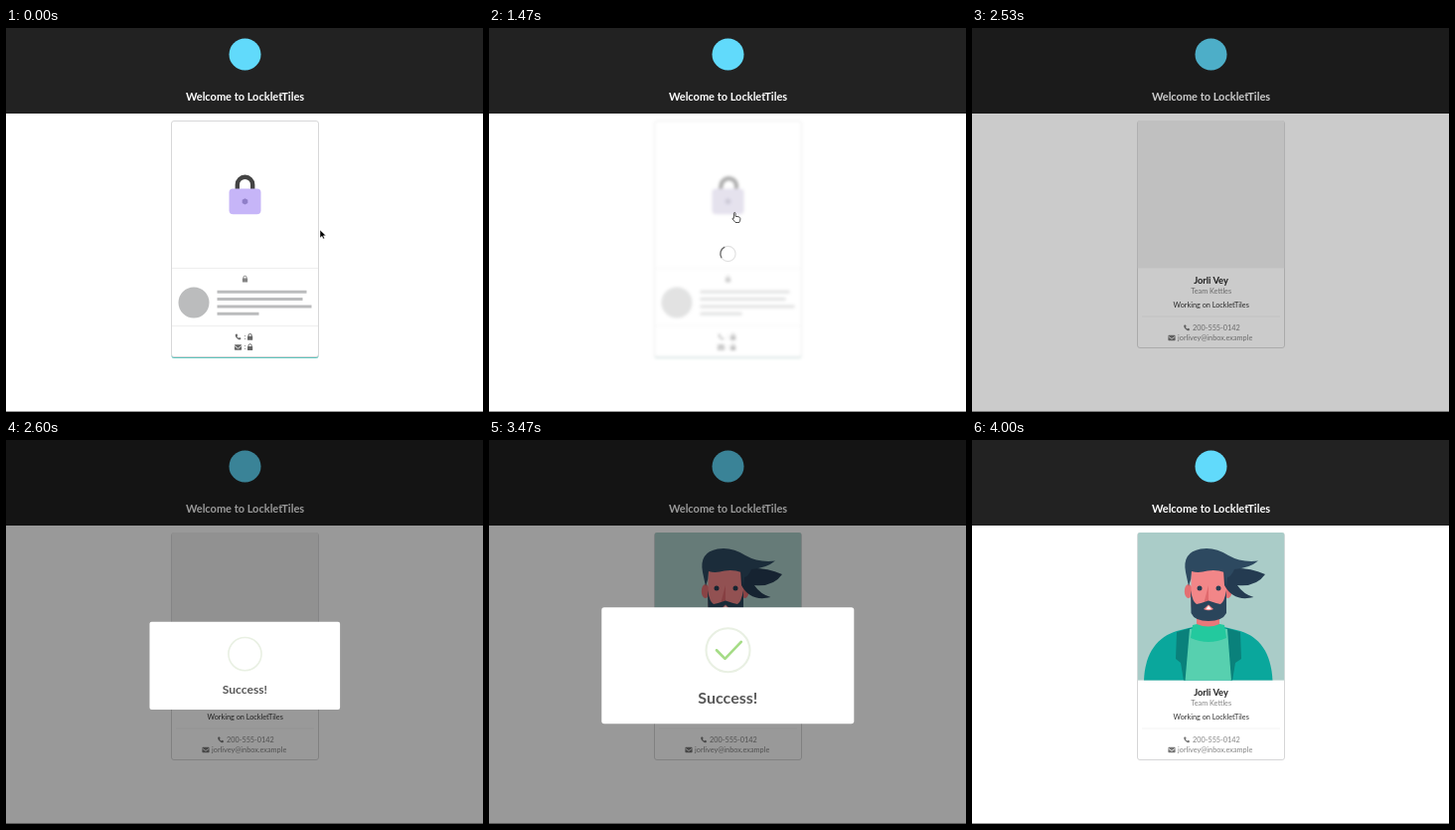
Animation, 480 px wide and 386 px high, one loop 4.07 s. Source, as an HTML page:

```html
<!DOCTYPE html>
<html lang="en">
<head>
<meta charset="utf-8">
<title>Profile unlock</title>
<style>
  html, body { margin: 0; width: 100%; height: 100%; overflow: hidden; background: #fff; }
  svg { display: block; width: 480px; height: 386px; font-family: Lato, sans-serif; }
  .mid { text-anchor: middle; }
  .small { font-size: 7.3px; fill: #858585; }
  .line { fill: none; stroke-linecap: round; stroke-linejoin: round; }
</style>
</head>
<body>
<svg viewBox="0 0 480 386">
  <defs>
    <g id="miniLock">
      <rect x="-2.6" y="-.7" width="5.2" height="4" rx=".6"/>
      <path d="M-1.6 0V-1.4A1.6 1.7 0 0 1 1.6-1.4V0" fill="none" stroke="currentColor"/>
    </g>
    <path id="phone" d="M-2.3-2.7L-1-2.9L-.3-1.2L-1.1-.5Q-.5 .7 .6 1.2L1.4 .4L3 1.2L2.6 2.6Q1.3 3.3-.5 2Q-2.8 .2-2.9-1.7Z"/>
    <g id="mail">
      <rect x="-3.6" y="-2.8" width="7.2" height="5.6" rx=".7"/>
      <path d="M-3.6-1.6L0 1.1L3.6-1.6" fill="none" stroke="#fff" stroke-width=".8"/>
    </g>
    <clipPath id="photoClip"><path d="M166.5 241.5V95.5Q166.5 93 169 93H312Q314.5 93 314.5 95.5V241.5Z"/></clipPath>
  </defs>

  <rect width="480" height="386" fill="#fff"/>
  <rect width="480" height="86" fill="#222"/>
  <circle cx="240.5" cy="26.5" r="16" fill="#61dafb"/>
  <text class="mid" x="240.5" y="73" font-size="11" font-weight="700" fill="#fff">Welcome to LockletTiles</text>

  <g id="locked">
    <rect x="166.5" y="94.5" width="148" height="237.5" rx="2.5" fill="#5fc4bd"/>
    <rect x="166.5" y="93.5" width="148" height="237" rx="2.5" fill="#fff" stroke="#d8d8d9"/>
    <path d="M167 241.5H314M167 299.5H314" stroke="#eee"/>
    <path id="shackle" class="line" d="M232.8 164V157.5A7.7 7.7 0 0 1 248.2 157.5V164" stroke="#444" stroke-width="4.4"/>
    <rect x="224.5" y="161.5" width="32" height="25.7" rx="4" fill="#c6b5f8"/>
    <path d="M240.5 171.3L243.3 172.8V176L240.5 177.5L237.7 176V172.8Z" fill="#8f7fc8"/>
    <g fill="#bbbcbd">
      <circle cx="189" cy="276" r="15.5"/>
      <path d="M212.5 263.7h90v3h-90zM212.5 271h86v3h-86zM212.5 278.5h95v3h-95zM212.5 285.7h42v3h-42z"/>
    </g>
    <g fill="#666" color="#666">
      <use href="#miniLock" x="240.5" y="252.3" opacity=".8"/>
      <use href="#phone" x="233.5" y="310.5"/>
      <use href="#mail" x="233.5" y="321"/>
      <use href="#miniLock" x="245.6" y="310.5"/>
      <use href="#miniLock" x="245.6" y="320.8"/>
      <text x="239.4" y="313" font-size="7.3">:</text>
      <text x="239.4" y="323.3" font-size="7.3">:</text>
    </g>
  </g>

  <g id="dimmer">
    <rect x="160" y="88" width="161" height="250" fill="#fff" opacity=".6"/>
    <circle class="line" cx="240.5" cy="227" r="7.6" stroke="#000" stroke-opacity=".12" stroke-width="1.2"/>
    <path id="spinner" class="line" d="M235.1 221.6A7.6 7.6 0 0 1 245.9 221.6" stroke="#666" stroke-width="1.3"/>
  </g>

  <g id="profile">
    <rect x="166.5" y="93.5" width="148" height="228" rx="2.5" fill="#fff" stroke="#d6d6d7"/>
    <g clip-path="url(#photoClip)">
      <rect x="166.5" y="93" width="148" height="149" fill="#f1f1f1"/>
      <g id="portrait">
        <rect x="166.5" y="93" width="148" height="149" fill="#aaccc8"/>
        <path d="M173 242C174 213 187 198 206 192L222 188H254L270 192C289 198 301 213 302.5 242Z" fill="#0aa79c"/>
        <path d="M206 193L220 189L215 242H213L210 224L205 220ZM256 189L270 193L271 220L265 224L262 242H260Z" fill="#0a817b"/>
        <path d="M219 190H257L261 242H214.5Z" fill="#57d0af"/>
        <path d="M222 186Q238 181 254 186L256 199Q238 207 220 199Z" fill="#23c99e"/>
        <path d="M226 168H249V185Q238 190 226 185Z" fill="#e9777a"/>
        <ellipse cx="217.8" cy="152" rx="4" ry="7" fill="#e46f72"/>
        <ellipse cx="257.5" cy="152" rx="4" ry="7" fill="#e46f72"/>
        <path d="M220.5 126H256V168Q238 182 220.5 168Z" fill="#f28688"/>
        <path d="M238 146V163H233.5Z" fill="#e0696d"/>
        <path d="M253 130Q274 126 295 135Q286 148 267 146Q273 155 283.5 158Q263 163 254 146Z" fill="#243b51"/>
        <path d="M218 147L215 133Q211 113 230 109.5Q244 107 258 116Q271 123.5 288 121.5Q279 129 264 130Q261 137 257 138L256 148L254 133Q246 130 237 131.5Q228 134 221 132Q221 140 218 147Z" fill="#2d4960"/>
        <path d="M220 151Q222 163 226 165Q231 164 238 161.5Q245 164 250 165Q254 163 256 151V174Q252 182 238 182Q224 182 220.5 174Z" fill="#2a455b"/>
        <path d="M233 170L238 165.5L243 170Q238 172.5 233 170Z" fill="#f28688"/>
        <path d="M235.5 169.7L238 166.7L240.7 169.7Q238 171 235.5 169.7Z" fill="#fff"/>
        <circle cx="229" cy="149" r="2.5" fill="#263d52"/>
        <circle cx="248" cy="149" r="2.5" fill="#263d52"/>
      </g>
    </g>
    <path d="M171 290H310" stroke="#f3f3f3"/>
    <text class="mid" x="240.5" y="256.5" font-size="9.3" font-weight="700" fill="#222">Jorli Vey</text>
    <text class="mid small" x="240.7" y="266.8">Team Kettles</text>
    <text class="mid" x="240.7" y="280.6" font-size="7.3" fill="#333">Working on LockletTiles</text>
    <g fill="#777">
      <use href="#phone" x="216" y="301.3"/>
      <use href="#mail" x="201" y="311.5"/>
    </g>
    <text class="small" x="222" y="304">200-555-0142</text>
    <text class="small" x="207" y="314">jorlivey@inbox.example</text>
  </g>

  <path d="M0 385.5H480" stroke="#999"/>
  <rect id="shade" width="480" height="386"/>

  <g id="modal">
    <rect x="-127" y="-58.5" width="254" height="117" rx="2.7" fill="#fff"/>
    <g class="line" transform="translate(.2 -15.5)" stroke="#a5dc86" stroke-width="2.1">
      <circle r="22" stroke="#e9f0e3"/>
      <path id="arc" stroke-linecap="butt"/>
      <path id="check" pathLength="1" stroke-dasharray="1 2" stroke-width="2.65" d="M-11.5 0L-3 8.6L13.3-8.4"/>
    </g>
    <text class="mid" y="38" font-size="16" font-weight="700" fill="#575757">Success!</text>
  </g>

  <g id="cursor">
    <path id="arrow" d="M0 0V8L2 6.3L3.2 9L4.5 8.4L3.4 5.8H6Z" stroke="#fff" stroke-width=".5"/>
    <path id="hand" d="M1.4 5.8V1Q1.4 0 2.2 0T3 1V3.8Q7.8 3.8 7.8 5.8V7.6L6.8 10H3L0 6.4Q0 5 1.4 5.8Z" fill="#fff" stroke="#222" stroke-width=".8" stroke-linejoin="round"/>
  </g>
</svg>
<script>
const LOOP = 4070, SWAP = 2470, POP = 2580, HIDE = 3550;
const $ = id => document.getElementById(id);
const ramp = (t, from, to) => Math.min(1, Math.max(0, (t - from) / (to - from)));
const smooth = p => p * p * (3 - 2 * p);
const mix = (a, b, p) => a + (b - a) * p;
const show = (id, on) => { $(id).style.display = on ? "" : "none"; };
const set = (id, name, value) => $(id).setAttribute(name, value);

function drawCursor(t) {
  const enter = smooth(ramp(t, 380, 760)), leave = smooth(ramp(t, 1600, 1840));
  const x = mix(mix(316, 245, enter), 436, leave);
  const y = mix(mix(203, 185.5, enter), 313, leave);
  const hand = x < 256 && t < 1600;
  show("cursor", t < 1870);
  show("hand", hand);
  show("arrow", !hand);
  set("cursor", "transform", `translate(${x} ${y})`);
}

function drawLocked(t) {
  const lift = 1.5 * (smooth(ramp(t, 550, 680)) - smooth(ramp(t, 1250, 1400)));
  const dim = smooth(ramp(t, 1250, 1500));
  show("locked", t < SWAP);
  show("dimmer", t < SWAP && dim > 0);
  set("locked", "transform", `translate(0 ${-lift})`);
  $("locked").style.filter = dim ? `blur(${1.8 * dim}px) grayscale(${0.6 * dim})` : "none";
  set("dimmer", "opacity", dim);
  set("spinner", "transform", `rotate(${(t - 2070) * 0.6 - 75} 240.5 227)`);
  const open = smooth(ramp(t, 1130, 1260));
  set("shackle", "d", `M232.8 164V157.5A7.7 7.7 0 0 1 248.2 157.5V${mix(164, 158, open)}`);
  set("shackle", "transform", `rotate(${10 * open} 232.8 163)`);
}

function modalScale(t) {
  if (t >= HIDE) return mix(1, 0.5, ramp(t, HIDE, HIDE + 135));
  const p = (t - POP) / 300;
  if (p < 0.45) return mix(0.7, 1.05, p / 0.45);
  if (p < 0.8) return mix(1.05, 0.95, smooth((p - 0.45) / 0.35));
  return mix(0.95, 1, smooth(ramp(p, 0.8, 1)));
}

// Arc exposed between a fixed half disc and a half disc turning anticlockwise.
function arcPath(turn) {
  const from = turn < 180 ? 58 - turn : -122;
  const to = turn < 180 ? 58 : 238 - turn;
  const point = deg => [Math.cos(deg * Math.PI / 180) * 22, Math.sin(deg * Math.PI / 180) * 22].join(" ");
  return to - from < 0.5 ? "" : `M${point(from)}A22 22 0 0 1 ${point(to)}`;
}

function drawModal(t) {
  show("modal", t >= POP && t < HIDE + 135);
  set("modal", "transform", `translate(240.3 226.8) scale(${modalScale(t)})`);
  set("modal", "opacity", 1 - ramp(t, HIDE, HIDE + 135));
  set("arc", "d", arcPath(360 * ramp(t, 2805, 3103) ** 2));
  const drawn = smooth(ramp(t, 2990, 3280));
  show("check", drawn > 0);
  set("check", "stroke-dashoffset", 1 - drawn);
}

function frame() {
  const t = performance.now() % LOOP;
  drawLocked(t);
  show("profile", t >= SWAP);
  show("portrait", t >= 2670);
  set("shade", "opacity", 0.4 * (ramp(t, 2480, 2580) - ramp(t, 3675, 3730)));
  drawModal(t);
  drawCursor(t);
  requestAnimationFrame(frame);
}
frame();
</script>
</body>
</html>
```
